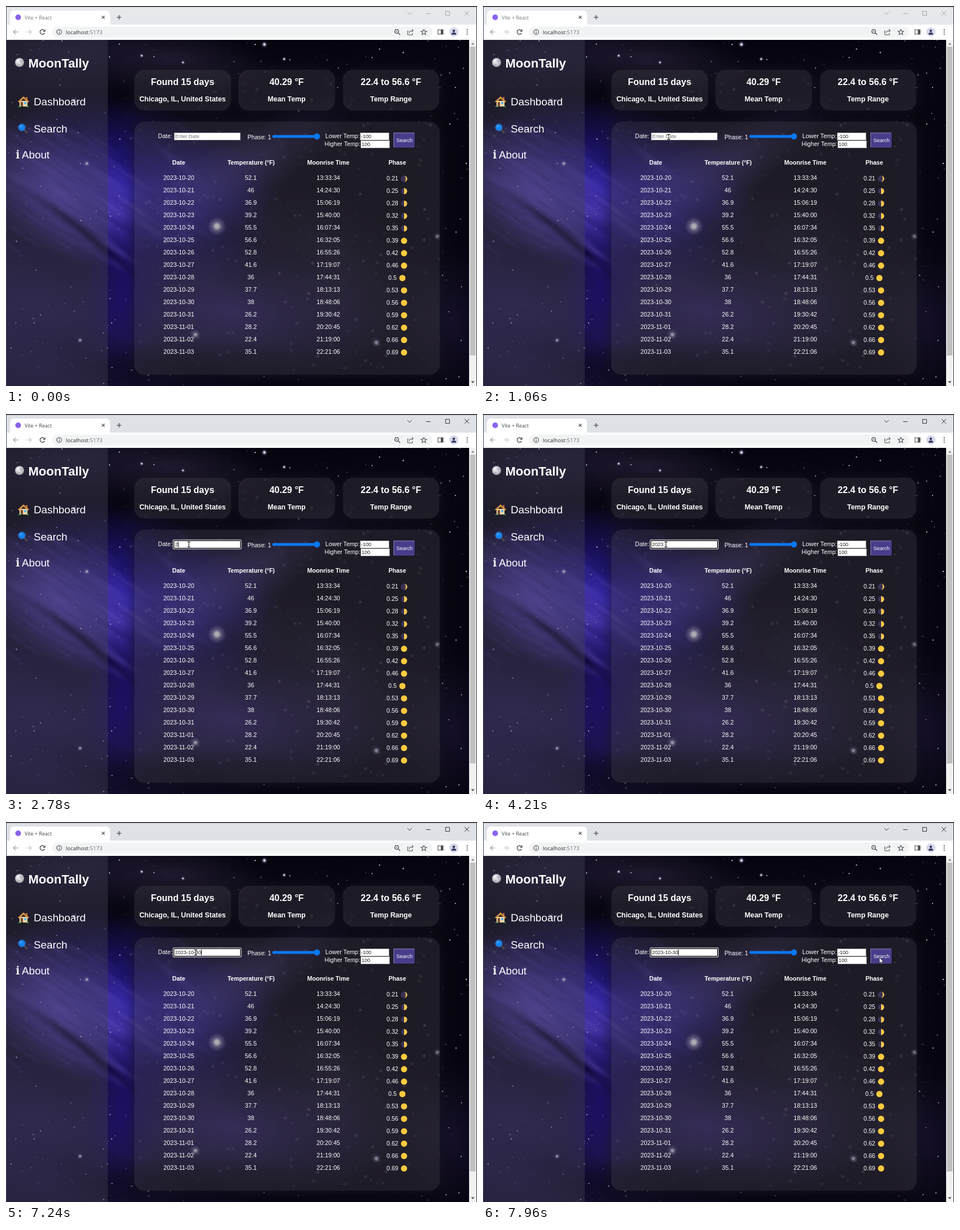
An HTML page with a canvas for the animation above (8 s loop, 833x673 px).

```html
<!DOCTYPE html>
<html lang="en">
<head>
<meta charset="utf-8">
<title>Moon dashboard</title>
<style>
html, body { margin: 0; width: 100%; height: 100%; overflow: hidden; background: #05040d; }
canvas { display: block; }
</style>
</head>
<body>
<canvas id="stage" width="833" height="673"></canvas>
<script>
const W = 833, H = 673, LOOP = 8000;
const SANS = '"Liberation Sans", Arial, sans-serif';
const UI = '"Open Sans", "Noto Sans", sans-serif';
const TAU = Math.PI * 2;

let g = document.getElementById('stage').getContext('2d');

// Paints into an offscreen canvas and returns it
function layer(paint) {
  const outer = g;
  const c = document.createElement('canvas');
  c.width = W;
  c.height = H;
  g = c.getContext('2d');
  paint();
  g = outer;
  return c;
}

function rect(x, y, w, h, color) {
  g.fillStyle = color;
  g.fillRect(x, y, w, h);
}

function round(x, y, w, h, r, color) {
  g.beginPath();
  g.roundRect(x, y, w, h, r);
  g.fillStyle = color;
  g.fill();
}

function dot(x, y, r, color) {
  g.beginPath();
  g.arc(x, y, r, 0, TAU);
  g.fillStyle = color;
  g.fill();
}

function ring(x, y, r, color, width = 1.1, from = 0, to = TAU) {
  g.beginPath();
  g.arc(x, y, r, from, to);
  g.strokeStyle = color;
  g.lineWidth = width;
  g.stroke();
}

function trace(points) {
  g.beginPath();
  for (let i = 0; i < points.length; i += 2) g.lineTo(points[i], points[i + 1]);
}

function line(points, color, width = 1.2) {
  trace(points);
  g.strokeStyle = color;
  g.lineWidth = width;
  g.stroke();
}

function shape(points, color) {
  trace(points);
  g.closePath();
  g.fillStyle = color;
  g.fill();
}

function label(text, x, y, size, { color = '#fff', bold = false, align = 'left', face = SANS } = {}) {
  g.font = `${bold ? 'bold ' : ''}${size}px ${face}`;
  g.textAlign = align;
  g.fillStyle = color;
  g.fillText(text, x, y);
  return g.measureText(text).width;
}

function randomizer(seed) {
  return () => {
    seed = (seed * 1664525 + 1013904223) >>> 0;
    return seed / 4294967296;
  };
}

// Soft elliptical cloud, tilted by an angle
function cloud(x, y, rx, ry, tilt, rgb, alpha) {
  g.save();
  g.translate(x, y);
  g.rotate(tilt);
  g.scale(rx, ry);
  const fade = g.createRadialGradient(0, 0, 0, 0, 0, 1);
  fade.addColorStop(0, `rgba(${rgb},${alpha})`);
  fade.addColorStop(0.5, `rgba(${rgb},${alpha * 0.5})`);
  fade.addColorStop(1, `rgba(${rgb},0)`);
  g.fillStyle = fade;
  g.fillRect(-1, -1, 2, 2);
  g.restore();
}

function sky() {
  rect(0, 0, W, H, '#06040f');
  cloud(60, 560, 420, 260, 0.3, '52,38,110', 0.7);
  cloud(230, 330, 270, 160, 0.35, '48,32,190', 0.85);
  cloud(100, 330, 190, 110, 0.5, '100,80,205', 0.8);
  cloud(330, 330, 190, 100, -0.4, '62,48,170', 0.6);
  cloud(440, 270, 200, 60, -0.5, '70,60,130', 0.4);
  cloud(400, 540, 280, 120, 0.15, '66,48,140', 0.65);
  cloud(215, 500, 80, 160, 0.1, '26,12,110', 0.8);
  cloud(600, 480, 230, 130, 0.5, '50,40,84', 0.45);
  cloud(290, 95, 190, 60, 0.1, '46,38,66', 0.6);
  cloud(100, 90, 170, 90, 0, '36,28,60', 0.6);
  cloud(790, 560, 90, 140, 0, '28,20,52', 0.6);
  cloud(120, 385, 130, 13, 0.62, '12,6,42', 0.75);
  cloud(160, 420, 120, 8, 0.7, '10,4,40', 0.7);
  cloud(50, 440, 110, 28, 0.55, '20,14,50', 0.5);
  cloud(130, 615, 170, 60, 0.4, '14,8,38', 0.5);
  cloud(470, 425, 140, 40, 0.45, '14,9,34', 0.6);
  cloud(340, 645, 260, 55, 0, '5,3,18', 0.8);
  cloud(700, 330, 130, 240, 0.2, '4,3,10', 0.7);

  const rnd = randomizer(29);
  for (let i = 0; i < 170; i++) {
    const x = rnd() * 330, y = 220 + rnd() * 240;
    cloud(x, y, 20 + rnd() * 50, 3 + rnd() * 8, 0.6, rnd() < 0.5 ? '120,100,220' : '16,8,60', 0.12);
  }
  for (let i = 0; i < 1250; i++) {
    const x = rnd() * 820, y = 60 + rnd() * 613, glow = rnd() ** 3;
    dot(x, y, 0.35 + glow * 0.85, `rgba(225,220,250,${0.3 + glow * 0.65})`);
  }
  const bright = [457, 68, 2, 143, 279, 2, 131, 592, 1.8, 335, 582, 3, 492, 94, 1.4,
    313, 100, 1.3, 240, 88, 1.3, 655, 596, 2.5, 120, 167, 1.8, 763, 408, 2];
  for (let i = 0; i < bright.length; i += 3) {
    const [x, y, r] = bright.slice(i, i + 3);
    cloud(x, y, r * 3, r * 3, 0, '210,200,255', 0.6);
    dot(x, y, r, '#f2efff');
  }
  cloud(373, 390, 16, 16, 0, '220,210,255', 0.9);
  dot(373, 390, 5.5, '#fff');
}

// Frosted panel over the blurred sky
function glass(x, y, w, h, backdrop) {
  g.save();
  g.shadowColor = 'rgba(24,22,34,0.75)';
  g.shadowBlur = 24;
  round(x, y, w, h, 18, '#14121e');
  g.restore();
  g.save();
  g.beginPath();
  g.roundRect(x, y, w, h, 18);
  g.clip();
  g.filter = 'blur(1.8px)';
  g.drawImage(backdrop, 0, 0);
  g.filter = 'none';
  rect(x, y, w, h, 'rgba(62,60,70,0.42)');
  g.restore();
}

function card(x, title, note, backdrop) {
  glass(x, 113, 171, 72, backdrop);
  label(title, x + 85.3, 140, 16, { bold: true, align: 'center' });
  label(note, x + 85.3, 169, 12.4, { bold: true, align: 'center' });
}

function moon(x, y, phase) {
  if (phase > 0.37) return dot(x, y, 5.5, '#fccb3e');
  dot(x, y, 5.5, '#3b3257');
  g.beginPath();
  g.arc(x, y, 5.5, -Math.PI / 2, Math.PI / 2);
  if (phase < 0.25) g.ellipse(x, y, 3, 5.5, 0, Math.PI / 2, -Math.PI / 2, true);
  g.fillStyle = '#f9c84c';
  g.fill();
}

function sidebar() {
  rect(0, 60, 180, 613, 'rgba(66,62,82,0.42)');
  const orb = g.createRadialGradient(21, 97, 1, 24, 100, 9);
  orb.addColorStop(0, '#f1eff2');
  orb.addColorStop(0.65, '#c4c2c8');
  orb.addColorStop(1, '#85838d');
  dot(24, 100, 8, orb);
  dot(27, 98, 1.7, '#aaa8b0');
  dot(22, 104, 1.4, '#aaa8b0');
  label('MoonTally', 39.5, 109, 22, { bold: true });

  rect(24, 168, 14, 10, '#f3d9a2');
  rect(35, 161, 3, 6, '#a85a3c');
  shape([21, 169, 31, 160, 41, 169, 39, 171, 31, 164, 23, 171], '#d79343');
  rect(26, 170, 4, 8, '#7c4a35');
  rect(32, 170, 4, 4, '#5ab0e8');
  rect(22, 177, 5, 2, '#4e9b4a');
  rect(36, 177, 4, 2, '#4e9b4a');
  label('Dashboard', 49, 175.5, 18.8);

  line([32, 219, 38, 225], '#4a4752', 3.6);
  dot(28, 215, 6.5, '#1683ee');
  ring(28, 215, 6, '#2b5f9c', 1);
  dot(26, 213, 1.6, '#5cb0ff');
  label('Search', 49, 224.2, 18.8);

  label('i', 17.5, 269.5, 19, { bold: true, face: '"Noto Serif", serif' });
  label('About', 28, 269.5, 18.8);
}

const temps = [52.1, 46, 36.9, 39.2, 55.5, 56.6, 52.8, 41.6, 36, 37.7, 38, 26.2, 28.2, 22.4, 35.1];
const rises = ('13:33:34 14:24:30 15:06:19 15:40:00 16:07:34 16:32:05 16:55:26 17:19:07 ' +
  '17:44:31 18:13:13 18:48:06 19:30:42 20:20:45 21:19:00 22:21:06').split(' ');
const phases = [0.21, 0.25, 0.28, 0.32, 0.35, 0.39, 0.42, 0.46, 0.5, 0.53, 0.56, 0.59, 0.62, 0.66, 0.69];

function table() {
  const mid = { align: 'center' };
  const head = { align: 'center', bold: true };
  label('Date', 305.5, 281.2, 10.6, head);
  label('Temperature (°F)', 433.5, 281.2, 10.55, head);
  label('Moonrise Time', 570, 281.2, 10.6, head);
  label('Phase', 692, 281.2, 10.6, head);
  temps.forEach((temp, i) => {
    const y = 308.2 + i * 21.97;
    const date = new Date(Date.UTC(2023, 9, 20 + i)).toISOString().slice(0, 10);
    label(date, 305.5, y, 10.7, mid);
    label(temp, 433, y, 10.7, mid);
    label(rises[i], 570, y, 10.7, mid);
    const x = phases[i] === 0.5 ? 676 : 673;
    const w = label(phases[i], x, y + 1, 10.7);
    moon(x + w + 10.2, y - 2.2, phases[i]);
  });
}

function field(x, y, w, h) {
  rect(x, y, w, h, '#77767c');
  rect(x + 1, y + 1, w - 2, h - 2, '#fff');
}

function form() {
  label('Date:', 268.8, 234.3, 10.6);
  label('Phase: 1', 427, 235.6, 10.6);
  round(471, 228.5, 84, 5, 2.5, '#0a78f5');
  dot(550, 231, 5.4, '#0a78f5');
  label('Lower Temp:', 564.8, 234.3, 10.6);
  label('Higher Temp:', 563.6, 248.4, 10.6);
  field(626, 224, 52, 14);
  field(627, 238, 52, 14);
  label('-100', 628, 234.2, 9, { color: '#222' });
  label('100', 629, 248.2, 9, { color: '#222' });
  rect(685, 224, 39, 28, '#14121f');
  rect(685, 224, 37.5, 26.5, '#6d66a0');
  rect(686.5, 225.5, 36, 25, '#483d8b');
  label('Search', 704.7, 241, 9, { align: 'center' });
}

function scrollbar() {
  rect(819, 60, 13, 613, '#f1f1f1');
  rect(820.5, 72, 10, 547, '#c1c1c1');
  shape([822.5, 68.5, 828.5, 68.5, 825.5, 65], '#8a8a8a');
  shape([822.5, 664.5, 828.5, 664.5, 825.5, 668], '#505050');
}

function toolbar() {
  const ink = '#4b4e52';
  rect(0, 33, W, 27, '#fff');
  round(82, 36.5, 672, 19, 9.5, '#f1f3f4');
  line([21.5, 46, 13, 46], '#9a9da1');
  line([17, 42, 13, 46, 17, 50], '#9a9da1');
  line([36.5, 46, 45, 46], '#c4c6c9');
  line([41, 42, 45, 46, 41, 50], '#c4c6c9');
  ring(64.5, 46, 4.2, ink, 1.4, 0.4, 5.5);
  shape([69.5, 41, 69.5, 45.5, 65, 45.5], ink);
  ring(94, 46, 4.3, ink);
  rect(93.4, 45.4, 1.2, 3, ink);
  rect(93.4, 43.2, 1.2, 1.2, ink);
  const w = label('localhost', 105.7, 49.6, 9.6, { color: '#26282b', face: UI });
  label(':5173', 105.7 + w, 49.6, 9.6, { color: '#6c7075', face: UI });

  ring(691, 45, 3.4, ink, 1.2);
  line([693.5, 47.5, 697, 51], ink, 1.4);
  line([689.4, 45, 692.6, 45], ink, 1);
  line([712, 44, 710.5, 44, 710.5, 51, 719, 51, 719, 48], ink, 1);
  line([713, 48, 714, 45, 720, 43.5], ink, 1);
  line([717.5, 41, 720.5, 43.5, 717.5, 46], ink, 1);
  const star = [];
  for (let i = 0; i <= 10; i++) {
    const a = -Math.PI / 2 + i * Math.PI / 5, r = i % 2 ? 2.3 : 5.2;
    star.push(739 + r * Math.cos(a), 46.3 + r * Math.sin(a));
  }
  line(star, ink, 1.1);
  line([764, 42, 773, 42, 773, 50, 764, 50, 764, 41.5], ink, 1.1);
  rect(769, 42, 4, 8, ink);
  dot(792, 46, 8, '#d5d8ea');
  dot(792, 44, 2.2, '#343a5c');
  round(788, 47, 8, 3.8, [3, 3, 0, 0], '#343a5c');
  for (const y of [42.2, 46, 49.8]) dot(815.7, y, 1.1, ink);
}

function tabs(active) {
  const ink = active ? '#33363a' : '#a3a5a8';
  rect(0, 0, W, 33, active ? '#dee1e6' : '#e7e8ec');
  rect(0, 0, W, 1.5, '#15161c');
  round(7, 8, 177, 26, [7, 7, 0, 0], '#fff');
  dot(21.5, 20, 5, '#8a63f0');
  label('Vite + React', 33, 23.6, 8.85, { color: active ? '#44474b' : '#75787c', face: UI });
  line([169.5, 17.5, 174.5, 22.5], '#4b4e52', 1.1);
  line([174.5, 17.5, 169.5, 22.5], '#4b4e52', 1.1);
  line([196, 20, 204, 20], '#4b4e52', 1.3);
  line([200, 16, 200, 24], '#4b4e52', 1.3);
  line([710, 11, 713.7, 15, 717.4, 11], ink, 1);
  line([743, 13.5, 751, 13.5], ink, 1);
  line([777.5, 9.5, 784.5, 9.5, 784.5, 16.5, 777.5, 16.5, 777.5, 9], ink, 1);
  line([811, 9, 819, 17], ink, 1);
  line([819, 9, 811, 17], ink, 1);
}

const page = layer(() => {
  const backdrop = layer(sky);
  g.drawImage(backdrop, 0, 0);
  sidebar();
  card(227, 'Found 15 days', 'Chicago, IL, United States', backdrop);
  card(411, '40.29 °F', 'Mean Temp', backdrop);
  card(595.5, '22.4 to 56.6 °F', 'Temp Range', backdrop);
  glass(227, 205, 540, 448, backdrop);
  form();
  table();
  scrollbar();
  toolbar();
});

const FOCUS = 1800;
const DATE = '2023-10-30';
const keys = [2780, 2990, 3490, 3690, 4300, 5310, 5980, 6170, 6680, 6850];

function dateField(t) {
  if (t < FOCUS) {
    field(297, 224, 118, 14);
    label('Enter Date', 299, 234.2, 9, { color: '#757575' });
    return;
  }
  round(295, 222.5, 121.5, 17, 2, '#fff');
  round(296, 223.5, 119.5, 15, 1, '#101010');
  rect(297.5, 225, 116.5, 12, '#fff');
  const count = keys.filter(k => k <= t).length;
  const typed = DATE.slice(0, count);
  let w = 0;
  if (count) w = label(typed, 299, 234.2, 9, { color: '#222' });
  else label('Enter Date', 299, 234.2, 9, { color: '#757575' });
  const since = t - (count ? keys[count - 1] : FOCUS);
  if (since % 1000 < 490) rect(Math.round(299 + w), 226, 1, 10, '#000');
}

// Pointer stops: time, x, y
const path = [
  [220, 5, 658], [480, 272, 302], [650, 272, 302], [820, 402, 240], [1060, 328, 232],
  [1270, 324, 231], [1440, 323, 231], [7200, 323, 231], [7560, 658, 235], [7960, 701, 240]
];

function pointer(t) {
  if (t < path[0][0]) return null;
  const i = path.findIndex(stop => stop[0] > t);
  if (i < 0) return path[path.length - 1].slice(1);
  const [t0, x0, y0] = path[i - 1], [t1, x1, y1] = path[i];
  const p = (t - t0) / (t1 - t0), k = p * p * (3 - 2 * p);
  return [x0 + (x1 - x0) * k, y0 + (y1 - y0) * k].map(Math.round);
}

const inside = ([x, y], left, top, right, bottom) => x >= left && x < right && y >= top && y < bottom;

function beam(x, y) {
  g.globalCompositeOperation = 'difference';
  rect(x, y - 4, 1, 8, '#fff');
  rect(x - 2, y - 5, 5, 1, '#fff');
  rect(x - 2, y + 4, 5, 1, '#fff');
  g.globalCompositeOperation = 'source-over';
}

function arrow(x, y) {
  const tip = [0, 0, 0, 10, 2.3, 8, 4, 11.5, 5.6, 10.8, 4, 7.4, 7.2, 7.2].map((v, i) => v + (i % 2 ? y : x));
  shape(tip, '#fff');
  line([...tip, x, y], '#000', 0.7);
}

function spinner() {
  rect(666, 226, 10, 10, '#ececec');
  shape([668.5, 230, 674, 230, 671.2, 227], '#505050');
  shape([668.5, 232, 674, 232, 671.2, 235], '#505050');
}

function draw(t) {
  g.drawImage(page, 0, 0);
  tabs(t >= FOCUS || (t >= 50 && t < 220));
  rect(0, 0, 1, H, '#3c4a66');
  rect(832, 0, 1, H, '#2b3040');
  dateField(t);
  const at = pointer(t);
  if (!at) return;
  if (inside(at, 626, 224, 678, 238)) spinner();
  const overText = inside(at, 269, 224, 415, 239) || inside(at, 427, 224, 468, 239) ||
    inside(at, 565, 224, 678, 252);
  (overText ? beam : arrow)(...at);
}

function tick(now) {
  draw(now % LOOP);
  requestAnimationFrame(tick);
}
draw(0);
requestAnimationFrame(tick);
</script>
</body>
</html>
```
